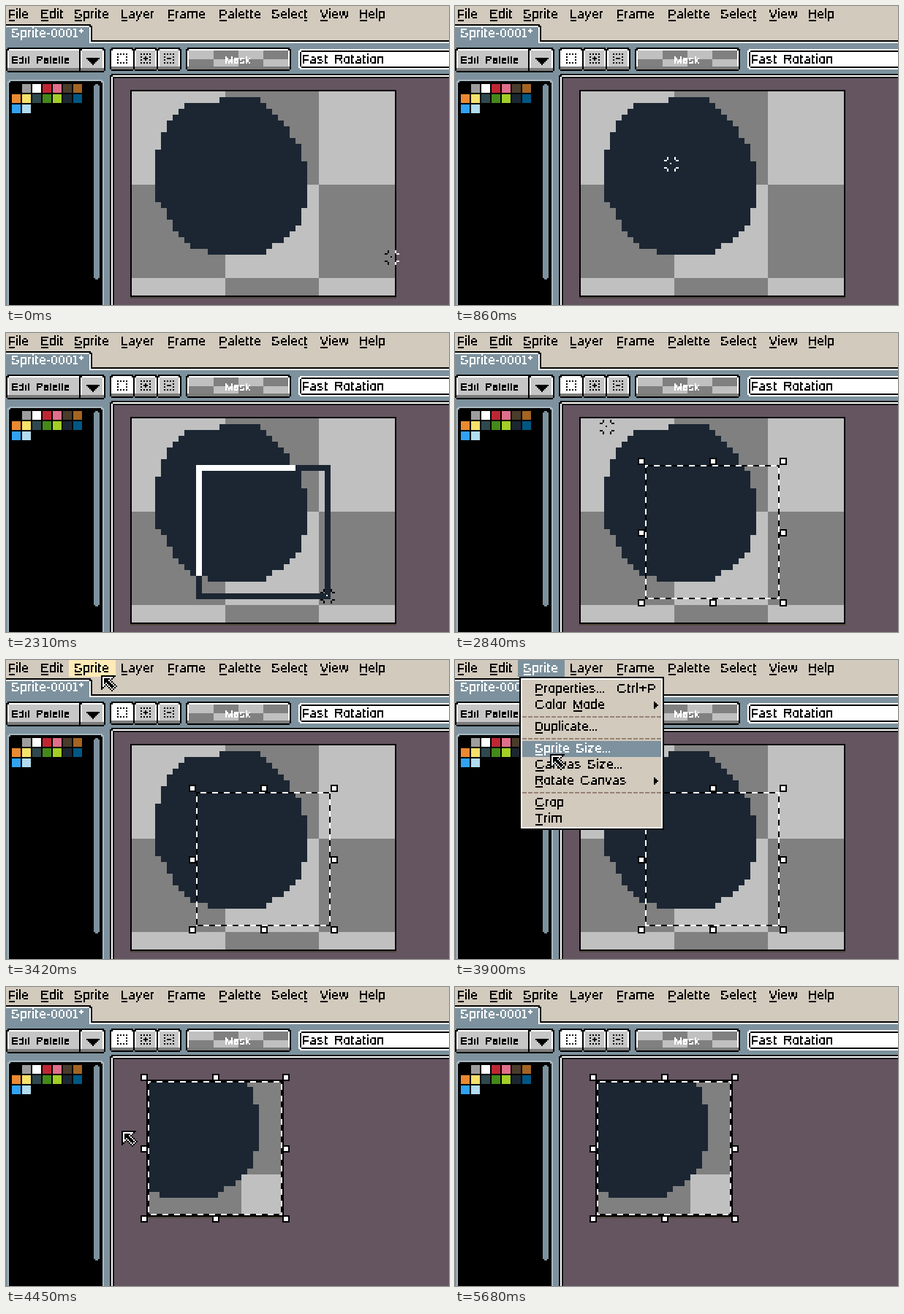
These frames come from a looping animation (606 px wide and 410 px high, 5.79 s). An HTML page with a canvas:

```html
<!DOCTYPE html>
<html lang="en">
<head>
<meta charset="utf-8">
<title>Crop to selection</title>
<style>
html, body { margin: 0; width: 100%; height: 100%; overflow: hidden; background: #7d929e; }
canvas { position: absolute; left: 0; top: -1px; width: 606px; height: 412px; image-rendering: pixelated; }
</style>
</head>
<body>
<canvas id="stage" width="303" height="206"></canvas>
<script>
const LOOP = 5790, STEP = 134.6;
const BLACK = '#000', WHITE = '#fff', FACE = '#d2cabd', BLUE = '#7d929e';
const GREY = '#c6c6c6', SHADE = '#7c7c7c', EDITOR = '#655561', INK = '#1b2632';
const UI = '9.2px "Liberation Sans", Arial, sans-serif';
const MINI = '7.5px "Liberation Sans", Arial, sans-serif';

const ctx = document.getElementById('stage').getContext('2d', { willReadFrequently: true });

// Stage units are screen pixels; one canvas pixel covers 2x2 of them.
function rect(x, y, w, h, color) {
  ctx.fillStyle = color;
  ctx.fillRect(x / 2, (y + 1) / 2, w / 2, h / 2);
}

// Box without its corner pixels
function chip(x, y, w, h, color) {
  rect(x + 2, y, w - 4, h, color);
  rect(x, y + 2, w, h - 4, color);
}

// Value at u on a polyline of [u, ...values] points
function along(points, u, k = 1) {
  const i = points.findIndex((p) => p[0] >= u);
  if (i < 0) return points[points.length - 1][k];
  if (i === 0) return points[0][k];
  const a = points[i - 1], b = points[i];
  return a[k] + (b[k] - a[k]) * (u - a[0]) / (b[0] - a[0]);
}

// Glyphs become hard dots, taken at the sub-pixel offset with the crispest stems.
const scratch = document.createElement('canvas').getContext('2d', { willReadFrequently: true });
const glyphs = new Map();
function glyph(ch, font) {
  const key = ch + font;
  if (glyphs.has(key)) return glyphs.get(key);
  let best = null, top = -1;
  for (let shift = 0; shift < 1; shift += 0.25) {
    scratch.clearRect(0, 0, 24, 16);
    scratch.font = font;
    scratch.fillText(ch, 4 + shift, 11);
    const alpha = scratch.getImageData(0, 0, 24, 16).data.filter((_, i) => i % 4 === 3);
    const score = alpha.reduce((sum, a) => sum + a * a, 0);
    if (score > top) [top, best] = [score, alpha];
  }
  const dots = [];
  best.forEach((a, i) => { if (a > 108) dots.push([i % 24, Math.floor(i / 24) - 11]); });
  const xs = dots.map((d) => d[0]);
  const left = Math.min(...xs);
  const made = {
    dots: dots.map(([x, y]) => [x - left, y]),
    w: dots.length ? Math.max(...xs) - left + 1 : 3,
  };
  glyphs.set(key, made);
  return made;
}

function text(str, x, base, color, font = UI, key = -1) {
  let pen = Math.round(x / 2) * 2;
  [...str].forEach((ch, i) => {
    const g = glyph(ch, font);
    for (const [dx, dy] of g.dots) rect(pen + dx * 2, base + dy * 2, 2, 2, color);
    if (i === key) rect(pen, base + 2, g.w * 2, 2, color);
    pen += g.w * 2 + 2;
  });
}

function button(x, y, w, h, fill = GREY) {
  chip(x, y, w, h, BLACK);
  chip(x + 2, y + 2, w - 4, h - 4, WHITE);
  rect(x + 4, y + 4, w - 8, h - 8, fill);
  rect(x + 2, y + h - 6, w - 4, 4, SHADE);
}

function triangle(x, y, w, down) {
  for (let i = 0; i < w; i += 2) {
    if (down) rect(x + i, y + i, (w - i) * 2 - 2, 2, BLACK);
    else rect(x + i, y + i, 2, (w - i) * 2 - 2, BLACK);
  }
}

const MENU = [['File', 3, 0], ['Edit', 48, 0], ['Sprite', 93, 0], ['Layer', 158, 0], ['Frame', 221, 0],
  ['Palette', 291, 0], ['Select', 363, 5], ['View', 430, 0], ['Help', 483, 0]];

const SWATCHES = ['#000', '#9d9d9d', '#fff', '#be2633', '#e06f8b', '#493c2b', '#a46422', '#eb8931',
  '#f7e26b', '#2f484e', '#44891a', '#a3ce27', INK, '#005784', '#31a2f2', '#b2dcef'];

function modeIcon(x, y, sign) {
  for (let i = 0; i < 14; i += 4) {
    rect(x + i, y, 2, 2, BLACK);
    rect(x + i, y + 12, 2, 2, BLACK);
    rect(x, y + i, 2, 2, BLACK);
    rect(x + 12, y + i, 2, 2, BLACK);
  }
  if (sign) rect(x + 4, y + 6, 6, 2, BLACK);
  if (sign === '+') rect(x + 6, y + 4, 2, 6, BLACK);
}

function drawChrome() {
  rect(0, -1, 606, 48, FACE);
  rect(0, 47, 606, 364, BLUE);
  rect(116, 47, 490, 2, BLACK);
  rect(116, 49, 490, 2, WHITE);

  chip(-4, 25, 122, 26, BLACK);
  chip(-4, 27, 120, 26, WHITE);
  rect(0, 29, 114, 24, BLUE);
  text('Sprite-0001*', 8, 43, WHITE);

  button(0, 57, 104, 34);
  button(100, 57, 36, 34);
  text('Edit Palette', 8, 79, BLACK, MINI);
  triangle(110, 71, 10, true);

  ['', '+', '-'].forEach((sign, i) => {
    button(142 + i * 32, 57, 34, 32, i ? GREY : WHITE);
    modeIcon(152 + i * 32, 65, sign);
  });

  button(246, 57, 144, 32, '#c0c0c0');
  for (let i = 0; i < 4; i++) rect(250 + i * 34, i % 2 ? 61 : 73, 34, i % 2 ? 12 : 10, '#808080');
  text('Mask', 300, 79, WHITE, MINI);

  chip(400, 59, 220, 28, WHITE);
  chip(402, 61, 220, 24, BLACK);
  rect(404, 63, 202, 20, WHITE);
  text('Fast Rotation', 406, 79, BLACK);

  chip(2, 101, 132, 330, '#a9b9c2');
  chip(4, 103, 128, 330, BLACK);
  SWATCHES.forEach((c, i) => rect(8 + i % 7 * 14, 107 + Math.floor(i / 7) * 14, 12, 12, c));
  chip(120, 107, 8, 268, BLUE);

  chip(142, 93, 500, 400, BLACK);
  chip(144, 95, 500, 400, WHITE);
  rect(146, 97, 460, 314, BLACK);
  rect(148, 99, 458, 312, EDITOR);
}

function drawMenuBar(hover, open) {
  if (hover || open) rect(86, -1, 64, 24, open ? BLUE : '#ffebb6');
  for (const [name, x, key] of MENU) {
    text(name, x, 17, open && name === 'Sprite' ? WHITE : BLACK, UI, key);
  }
}

// Corner points of the blob's two sides: row, column
const LEFT = [[1, 15], [2, 9], [5, 6], [10, 4.4], [18, 4.4], [23, 7.4], [26, 10], [27, 13]];
const RIGHT = [[1, 22], [6, 26.8], [9, 28.6], [12, 29.6], [19, 29.6], [22, 28.6], [25, 26], [27, 22.8]];
const span = (r) => r < 1 || r > 27 ? [0, 0] : [Math.round(along(LEFT, r)), Math.round(along(RIGHT, r))];

function drawSprite(x, y, cols, rows, c0, r0) {
  const w = cols * 8, h = rows * 8;
  rect(x - 2, y + h + 2, w + 4, 2, '#50483e');
  rect(x - 2, y - 2, w + 4, h + 4, BLACK);
  for (let j = 0; j < h; j += 128) {
    for (let i = 0; i < w; i += 128) {
      rect(x + i, y + j, Math.min(128, w - i), Math.min(128, h - j), (i + j) / 128 % 2 ? '#808080' : '#c0c0c0');
    }
  }
  for (let r = 0; r < rows; r++) {
    const [a, b] = span(r + r0);
    const from = Math.max(a - c0, 0), to = Math.min(b - c0, cols);
    if (to > from) rect(x + from * 8, y + r * 8, (to - from) * 8, 8, INK);
  }
}

// Rubber band from cell (11, 8), contrasting with the drawing below
function drawBand(c1, r1) {
  for (let r = 8; r <= r1; r++) {
    const [a, b] = span(r);
    for (let c = 11; c <= c1; c++) {
      const edge = r === 8 || r === r1 || c === 11 || c === c1;
      if (edge) rect(172 + c * 8, 117 + r * 8, 8, 8, c >= a && c < b ? WHITE : INK);
    }
  }
}

// Marching ants run one way along top and left, the other along bottom and right.
function drawSelection(x, y, time) {
  const size = 184, phase = 2 - Math.floor(time / 100);
  const ant = (i, shift) => ((i / 2 + shift) & 7) < 4 ? BLACK : WHITE;
  for (let i = 0; i < size; i += 2) {
    rect(x + i, y, 2, 2, ant(i, phase));
    rect(x, y + i, 2, 2, ant(i, phase));
    rect(x + i, y + size - 2, 2, 2, ant(i, -phase));
    rect(x + size - 2, y + i, 2, 2, ant(i, -phase));
  }
  const spots = [-10, 88, size];
  for (const dy of spots) {
    for (const dx of spots) {
      if (dx === 88 && dy === 88) continue;
      rect(x + dx, y + dy, 10, 10, BLACK);
      rect(x + dx + 2, y + dy + 2, 6, 6, WHITE);
    }
  }
}

const ITEMS = [['Properties...', 39, 0], ['Color Mode', 61, 6], ['Duplicate...', 91, 0], ['Sprite Size...', 121, 0],
  ['Canvas Size...', 143, 0], ['Rotate Canvas', 165, 0], ['Crop', 195, 0], ['Trim', 217, 0]];

function drawMenu(py) {
  rect(88, 23, 198, 210, BLACK);
  rect(90, 25, 194, 206, WHITE);
  rect(92, 27, 190, 202, FACE);
  for (const y of [77, 107, 181]) {
    for (let x = 92; x < 280; x += 8) rect(x, y, 6, 2, '#968275');
  }
  for (const [name, y, key] of ITEMS) {
    const hot = py >= y - 10 && py < y + 12;
    const color = hot ? WHITE : BLACK;
    if (hot) rect(92, y - 10, 190, 22, BLUE);
    text(name, 110, y + 6, color, UI, key);
    if (name === 'Properties...') text('Ctrl+P', 222, y + 6, color);
    if (name === 'Color Mode' || name === 'Rotate Canvas') triangle(272, y - 4, 6, false);
  }
}

// Every dot turns black or white against what lies below it.
function drawCross(x, y) {
  const dots = [[-2, -2]];
  for (const sx of [-1, 1]) {
    for (const sy of [-1, 1]) {
      for (const [a, b] of [[5, 9], [5, 7], [9, 5], [7, 5]]) dots.push([sx * a - 1, sy * b - 1]);
    }
  }
  const inks = dots.map(([dx, dy]) => {
    const [r, g, b] = ctx.getImageData((x + dx) / 2, (y + dy + 1) / 2, 1, 1).data;
    return (r + g + b) / 3 < 110 ? WHITE : BLACK;
  });
  dots.forEach(([dx, dy], i) => rect(x + dx, y + dy, 2, 2, inks[i]));
}

// Black arrow with a white line inside its rim
function drawArrow(x, y) {
  const solid = (a, b) => a >= 0 && b >= 0 && a < 11 && b < 11 &&
    (a + b < 10 || (Math.abs(a - b) < 4 && a + b < 18));
  const inner = (a, b) => solid(a, b) && solid(a - 1, b) && solid(a + 1, b) && solid(a, b - 1) && solid(a, b + 1);
  const core = (a, b) => inner(a - 1, b) && inner(a + 1, b) && inner(a, b - 1) && inner(a, b + 1);
  for (let b = 0; b < 11; b++) {
    for (let a = 0; a < 11; a++) {
      if (solid(a, b)) rect(x + a * 2, y + b * 2, 2, 2, inner(a, b) && !core(a, b) ? WHITE : BLACK);
    }
  }
}

// Pointer path: step, x, y
const PATH = [[0, 528, 345], [2, 344, 257], [3, 312, 225], [5, 280, 201], [7, 264, 185], [8, 264, 185],
  [10, 352, 265], [11, 408, 329], [15, 440, 361], [16, 460, 381], [19, 208, 129], [20, 170, 77],
  [23, 130, 21], [24, 130, 23], [27, 130, 129], [29, 158, 197], [33, 158, 197], [36, 286, 341]];

const PRESS = 9, RELEASE = 16, ARROW = 20, HOVER = 23, OPEN = 24, CLOSE = 30, CROP = 31, CROSS = 34, GONE = 37;

function draw(step) {
  const grid = step < RELEASE ? 8 : 2;
  const x = 264 + Math.round((along(PATH, step, 1) - 264) / grid) * grid;
  const y = 185 + Math.round((along(PATH, step, 2) - 185) / grid) * grid;
  const open = step >= OPEN && step < CLOSE;
  const time = 430 + (step - 1) * STEP;
  drawChrome();
  drawMenuBar(step === HOVER, open);
  if (step >= CROP) {
    drawSprite(194, 129, 23, 23, 11, 8);
    drawSelection(194, 129, time);
  } else {
    drawSprite(172, 117, 45, 35, 0, 0);
    if (step >= RELEASE) drawSelection(260, 181, time);
    else if (step >= PRESS) drawBand((x - 176) / 8, (y - 121) / 8);
  }
  if (open) drawMenu(y);
  if (step >= ARROW && step < CROSS) drawArrow(x, y);
  else if (step < GONE) drawCross(x, y);
}

// The picture advances in even steps after a short rest.
let shown = -1;
function tick() {
  const t = performance.now() % LOOP;
  const step = Math.max(0, Math.floor((t - 398) / STEP) + 1);
  if (step !== shown) draw(shown = step);
  requestAnimationFrame(tick);
}
tick();
</script>
</body>
</html>
```
